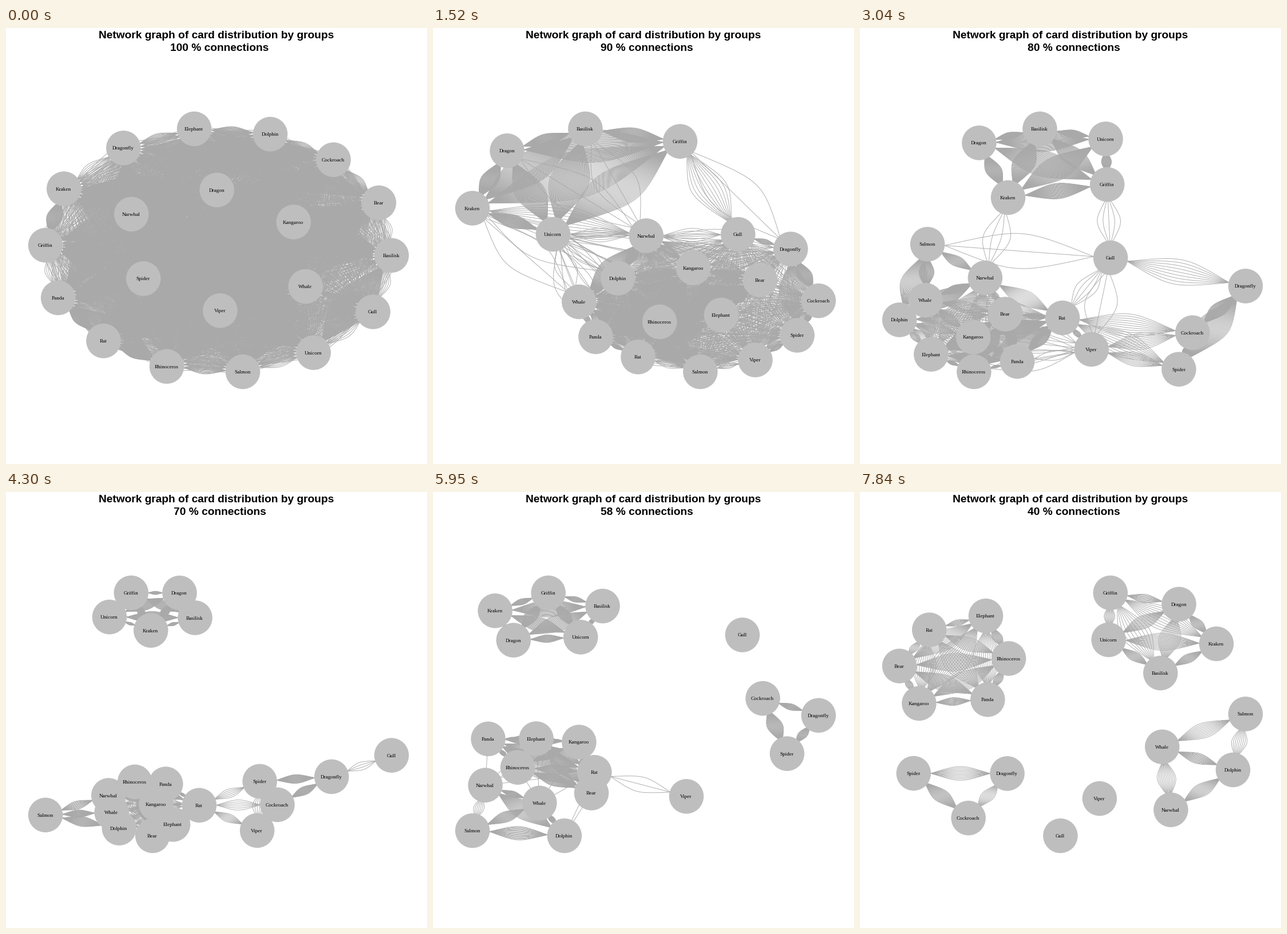
Write a matplotlib script that moves like this. It is 736x761 px and loops after 8 s.

```python
import matplotlib.pyplot as plt
import numpy as np
from matplotlib.animation import FuncAnimation
from matplotlib.collections import EllipseCollection, LineCollection

W, H, DPI = 736, 761, 100
LOOP, STEP = 8000, 40
EDGE, NODE = "#a9a9a9", "#bebebe"
CENTER = np.array([371.5, 388.0])
HALF = np.array([302.5, 212.0])

GROUP = dict(Basilisk="B", Bear="A", Cockroach="D", Dolphin="C", Dragon="B",
             Dragonfly="F", Elephant="A", Griffin="H", Gull="G", Kangaroo="A",
             Kraken="K", Narwhal="N", Panda="A", Rat="R", Rhinoceros="A",
             Salmon="S", Spider="D", Unicorn="U", Viper="V", Whale="C")
NAMES = list(GROUP)
N = len(NAMES)

# Percentage above which two groups are linked
START = {0: "DD", 10: "AA BB BK BU CC CN KU", 20: "AR BH HK HU DF CS",
         45: "NS", 52: "RV", 57: "AC AN CR NR DR DV", 62: "FG", 72: "GR GH",
         75: "AV KN GS GV", 80: "AS RS NU AD AF",
         82: "FR FV CV NV SV DG AG CG GN CD DN CF FN DS FS",
         86: "AU CU RU CK FH BN"}
FIRST = {pair: s for s, pairs in START.items() for pair in pairs.split()}

# Rough shapes that the layouts settle from
rough = {}


def arc(key, names, cx, cy, rx, ry, start, step=None):
    """Names clockwise on an ellipse, angles in degrees from the top."""
    names = names.split()
    step = step or 360 / len(names)
    for k, name in enumerate(names):
        a = np.radians(start + k * step)
        put(key, name, cx + rx * np.sin(a), cy - ry * np.cos(a))


def row(key, names, x0, y0, x1, y1):
    names = names.split()
    for name, t in zip(names, np.linspace(0, 1, len(names))):
        put(key, name, x0 + t * (x1 - x0), y0 + t * (y1 - y0))


def put(key, name, x, y):
    pos = rough.setdefault(key, np.zeros((N, 2)))
    pos[NAMES.index(name)] = x, y


arc(100, "Elephant Dolphin Cockroach Bear Basilisk", *CENTER, 300, 210, -6.3, 24)
arc(100, "Salmon Rhinoceros Rat Panda Griffin", *CENTER, 300, 210, 173.7, 24)
arc(100, "Dragon Kangaroo", *CENTER, 136, 96, -5, 70)
arc(100, "Viper Spider", *CENTER, 136, 96, 175, 70)
row(100, "Gull Kraken", 674, 508, 69, 268)
row(100, "Unicorn Dragonfly", 524, 567, 219, 209)
row(100, "Whale Narwhal", 549, 461, 194, 315)

row(90, "Dragon Basilisk Griffin", 81, 176, 413, 200)
row(90, "Kraken Unicorn", 69, 319, 283, 318)
row(90, "Narwhal Dolphin Kangaroo Bear", 191, 426, 528, 425)
row(90, "Whale Panda Rhinoceros Elephant", 171, 518, 515, 488)
row(90, "Rat Salmon Viper Spider", 315, 575, 627, 575)
arc(90, "Gull Dragonfly Cockroach", 475, 496, 199, 129, 0, 45)

arc(80, "Basilisk Unicorn Griffin Kraken Dragon", 299, 229, 125, 65, -10)
row(80, "Salmon Narwhal Whale Bear Rat", 89, 381, 374, 519)
arc(80, "Dolphin Elephant Rhinoceros Panda", 190, 500, 121, 100, 270, -39)
row(80, "Kangaroo Gull", 188, 539, 419, 408)
row(80, "Viper Spider", 408, 576, 581, 600)
row(80, "Cockroach Dragonfly", 611, 537, 674, 445)

arc(70, "Griffin Dragon Basilisk Kraken Unicorn", 275, 208, 75, 36, -32)
arc(70, "Panda Kangaroo Elephant Bear Dolphin Whale Narwhal Rhinoceros",
    222, 552, 56, 48, 20)
arc(70, "Spider Cockroach Viper", 428, 556, 38, 44, 15, 75)
row(70, "Salmon Rat", 69, 588, 328, 554)
row(70, "Dragonfly Gull", 565, 508, 674, 474)

arc(65, "Dragon Basilisk Unicorn Kraken Griffin", 345, 208, 73, 36, -32)
arc(65, "Panda Kangaroo Bear Rhinoceros", 212, 545, 68, 55, 35, 43)
row(65, "Dolphin Narwhal", 150, 489, 143, 561)
row(65, "Whale Elephant", 198, 529, 218, 562)
arc(65, "Cockroach Spider Viper", 432, 556, 38, 42, 18, 75)
row(65, "Salmon Rat", 69, 518, 343, 549)
row(65, "Dragonfly Gull", 566, 514, 674, 488)

arc(50, "Griffin Gull Dragonfly Bear Whale Viper Unicorn Spider Rhinoceros "
    "Dolphin Dragon Narwhal Cockroach Kangaroo Kraken", *CENTER, 306, 214, -8.4)
arc(50, "Basilisk Elephant Salmon Panda Rat", *CENTER, 143, 100, 0)

arc(40, "Elephant Rhinoceros Panda Kangaroo Bear Rat", 164, 296, 100, 76, 27)
arc(40, "Griffin Dragon Kraken Basilisk Unicorn", 513, 242, 104, 72, -38)
arc(40, "Salmon Dolphin Narwhal Whale", 600, 466, 82, 85, 40, 83)
arc(40, "Dragonfly Cockroach Spider", 181, 518, 90, 50, 60)
row(40, "Viper Gull", 413, 526, 362, 600)

TIMES = [0, 860, 1520, 1780, 2380, 2640, 3040, 3240, 3640, 3830, 4300, 4560,
         4890, 5160, 5430, 5690, 5950, 6220, 6480, 6750, 7080, 7350, 7610, 7840]
KEY_TIMES = [0, 1520, 3040, 4300, 5160, 6750, 7840]
PERCENTS = np.rint(np.interp(TIMES, KEY_TIMES, list(rough))).astype(int)

vary = np.random.default_rng(4).uniform(.88, 1.12, (N, N))


def link_counts(percent):
    counts = np.zeros((N, N), int)
    for i in range(N):
        for j in range(i):
            pair = "".join(sorted(GROUP[NAMES[i]] + GROUP[NAMES[j]]))
            start = FIRST.get(pair, 90)
            gain = .5 + .01 * max(0, start - 60)
            n = round(gain * (percent - start) * vary[i, j])
            counts[i, j] = counts[j, i] = max(0, n)
    return counts


def hops(counts):
    """Graph distances; unreachable pairs get the longest one."""
    d = np.where(counts > 0, 1.0, np.inf)
    np.fill_diagonal(d, 0)
    for k in range(N):
        d = np.minimum(d, d[:, k:k + 1] + d[k])
    d[np.isinf(d)] = d[np.isfinite(d)].max()
    return d


def laplacian(w):
    return np.diag(w.sum(1)) - w


def settle(pos, counts, rounds=80):
    """Spring layout by stress majorization, stretched to the plot box."""
    d = hops(counts) + np.eye(N)
    w = 1 / d**2 - np.eye(N)
    inverse = np.linalg.pinv(laplacian(w))
    x = (pos - CENTER) / HALF
    for _ in range(rounds):
        gap = np.linalg.norm(x[:, None] - x[None], axis=2) + 1e-6
        x = inverse @ laplacian(w * d / gap) @ x
    lo, hi = x.min(0), x.max(0)
    return CENTER + HALF * (2 * (x - lo) / (hi - lo) - 1)


def start_shape(percent):
    above = min(k for k in rough if k >= percent)
    below = max(k for k in rough if k <= percent)
    mix = (above - percent) / max(1, above - below)
    return rough[above] * (1 - mix) + rough[below] * mix


def blend(t, d):
    u, p = t / d, 2 * d * d
    return u**3 * (10 - p + (2 * p - 15) * u + (6 - p) * u * u)


def spline_weights(n=9):
    """X-spline weights of the two ends and the control point between."""
    t = np.linspace(0, 1, n)
    w = np.column_stack([blend(t - 2, -2), blend(t, 1), blend(t, 2)])
    w /= w.sum(1, keepdims=True)
    return np.vstack([w, w[-2::-1, ::-1]])


WEIGHTS = spline_weights()


def bundle(a, b, count):
    """Fan of curves between two nodes, in layout units."""
    trim = .1 * (b - a) / np.hypot(*(b - a))
    a, b = a + trim, b - trim
    dx, dy = b - a
    bend = np.linspace(-.25, .25, count) if count > 1 else np.zeros(1)
    ctrl = np.empty((count, 3, 2))
    ctrl[:, 0], ctrl[:, 2] = a, b
    ctrl[:, 1] = (a + b) / 2 + bend[:, None] * np.array([-dy, dx])
    return WEIGHTS @ ctrl


def curves(pos, counts):
    unit = (pos - CENTER) / HALF
    fans = [bundle(unit[i], unit[j], counts[i, j])
            for i, j in np.argwhere(np.triu(counts))
            if np.hypot(*(unit[i] - unit[j])) > .2]
    return np.concatenate(fans) * HALF + CENTER


def pt(px):
    return px * 72 / DPI


fig = plt.figure(figsize=(W / DPI, H / DPI), dpi=DPI, facecolor="white")
ax = fig.add_axes([0, 0, 1, 1])
ax.set_xlim(0, W)
ax.set_ylim(H, 0)
ax.axis("off")

places, webs = [], []
for percent in PERCENTS:
    counts = link_counts(percent)
    pos = settle(start_shape(percent), counts)
    web = LineCollection(curves(pos, counts), colors=EDGE, linewidths=pt(.9),
                         joinstyle="round", visible=False, zorder=1)
    ax.add_collection(web, autolim=False)
    places.append(pos)
    webs.append(web)

size = np.full(N, 60.5)
nodes = EllipseCollection(size, size, np.zeros(N), units="xy",
                          offsets=places[0], offset_transform=ax.transData,
                          facecolors=NODE, edgecolors="none", zorder=2)
ax.add_collection(nodes, autolim=False)
labels = [ax.text(0, 0, name, family="Liberation Serif", size=pt(9.1),
                  ha="center", va="baseline", zorder=3) for name in NAMES]

title = dict(family="Liberation Sans", weight="bold", size=pt(19.1),
             ha="center", va="baseline")
ax.text(368, 18.5, "Network graph of card distribution by groups", **title)
subtitle = ax.text(373.5, 40.5, "", **title)


def draw(frame):
    now = frame * STEP + STEP - 10
    state = int(np.searchsorted(TIMES, now, side="right")) - 1
    for k, web in enumerate(webs):
        web.set_visible(k == state)
    nodes.set_offsets(places[state])
    for label, (x, y) in zip(labels, places[state]):
        label.set_position((x - .5, y + 3))
    subtitle.set_text(f"{PERCENTS[state]} % connections")
    return [*webs, nodes, *labels, subtitle]


anim = FuncAnimation(fig, draw, frames=LOOP // STEP, interval=STEP,
                     repeat=True, repeat_delay=0, blit=False)
plt.show()
```
